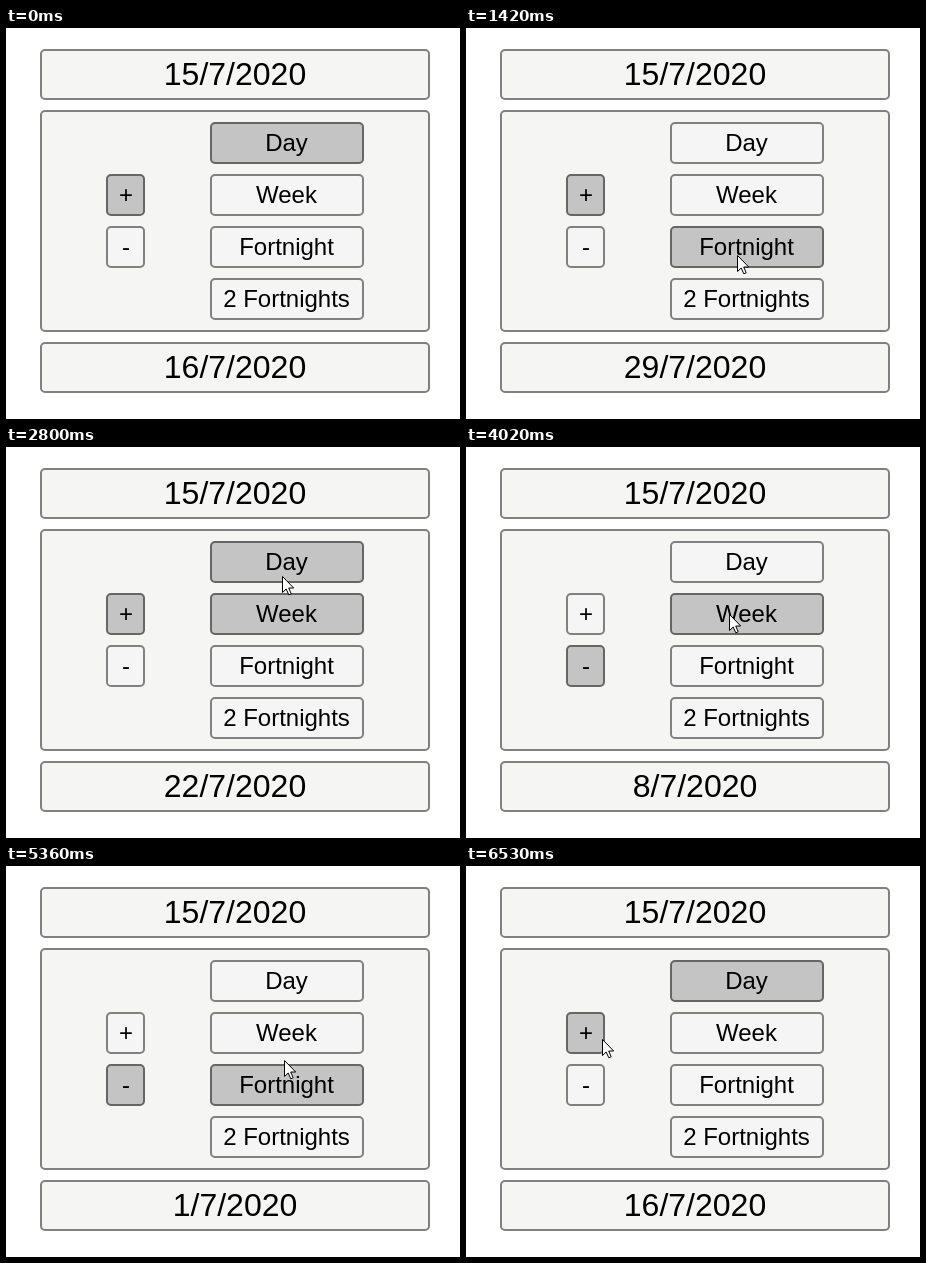
Write an HTML page that moves like this. It is 454 px wide and 391 px high and loops after 6580 ms.

```html
<!DOCTYPE html>
<html>
<head>
<meta charset="utf-8">
<style>
html, body { margin: 0; width: 100%; height: 100%; overflow: hidden; background: #fff; }
div {
  position: absolute; box-sizing: border-box;
  border: 2px solid #808080; border-radius: 5px; background: #f5f5f3; color: #000;
  font-family: "Liberation Sans", Arial, sans-serif; text-align: center; white-space: nowrap;
}
div.button { background: #f5f5f5; }
div.on { background: #c4c4c4; border-color: #666; }
svg { position: absolute; left: 0; top: 0; overflow: visible; }
</style>
</head>
<body>
<script>
const LOOP = 6580;

function box(x, y, w, h, size, text = '', className = '') {
  const el = document.createElement('div');
  el.style.cssText = `left:${x}px;top:${y}px;width:${w}px;height:${h}px;font-size:${size}px;line-height:${h - 4}px`;
  el.textContent = text;
  el.className = className;
  document.body.append(el);
  return el;
}

box(34, 21, 390, 51, 32, '15/7/2020');
box(34, 82, 390, 222, 24);
const result = box(34, 314, 390, 51, 32);

// tipY: where the pointer rests, measured from the top of the button
function button(label, group, value, row, tipY) {
  const [x, w] = group === 'days' ? [203.5, 154] : [100.4, 39];
  const y = 94 + 52 * row, h = 42;
  return { group, value, x, y, w, h, tipY: y + tipY, el: box(x, y, w, h, 24, label, 'button') };
}

const day = button('Day', 'days', 1, 0, 35);
const week = button('Week', 'days', 7, 1, 21);
const fortnight = button('Fortnight', 'days', 14, 2, 29);
const month = button('2 Fortnights', 'days', 28, 3, 14);
const plus = button('+', 'sign', 1, 1, 27);
const minus = button('-', 'sign', -1, 2, 17);
const buttons = [day, week, fortnight, month, plus, minus];

document.body.insertAdjacentHTML('beforeend',
  `<svg width="14" height="22"><path d="M.5 .5V16.5L4.2 13L6.8 18.8L9.2 17.8L6.7 12H11.7Z"
   fill="#fff" stroke="#000"/></svg>`);
const cursor = document.querySelector('svg');

// Each visit: button, arrival, click, pointer x
const visits = [
  [week, 380, 810, 277], [fortnight, 1090, 1260, 271], [month, 1600, 1700, 271],
  [fortnight, 2090, 2270, 272], [week, 2450, 2560, 275], [day, 2800, 3020, 276],
  [minus, 3370, 3460, 121], [week, 3800, 3970, 263], [fortnight, 4210, 4330, 265],
  [month, 4600, 4790, 267], [fortnight, 5010, 5160, 271], [week, 5414, 5550, 283],
  [day, 5860, 5970, 279], [plus, 6400, 6455, 136],
].map(([target, arrive, click, x]) => ({ target, arrive, click, x, y: target.tipY }));
const entry = { arrive: 90, x: 289, y: 343 };

function pointerAt(t) {
  if (t < entry.arrive) return null;
  let from = entry;
  for (const to of visits) {
    if (t < to.arrive) {
      const travel = Math.max(120, 1.4 * Math.hypot(to.x - from.x, to.y - from.y));
      const k = Math.max(0, 1 - (to.arrive - t) / travel);
      return { x: Math.round(from.x + (to.x - from.x) * k), y: Math.round(from.y + (to.y - from.y) * k) };
    }
    from = to;
  }
  return from;
}

const inside = (p, b) => p.x >= b.x && p.x < b.x + b.w && p.y >= b.y && p.y < b.y + b.h;

function draw(t) {
  const tip = pointerAt(t);
  const chosen = { days: day, sign: plus };
  for (const { target, click } of visits) {
    if (click <= t) chosen[target.group] = target;
  }
  for (const b of buttons) {
    b.el.classList.toggle('on', chosen[b.group] === b || Boolean(tip && inside(tip, b)));
  }
  const date = new Date(2020, 6, 15 + chosen.sign.value * chosen.days.value);
  result.textContent = `${date.getDate()}/${date.getMonth() + 1}/${date.getFullYear()}`;
  cursor.style.display = tip ? '' : 'none';
  if (tip) cursor.style.transform = `translate(${tip.x}px,${tip.y}px)`;
}

const origin = performance.now();
function frame() {
  draw((performance.now() - origin) % LOOP);
  requestAnimationFrame(frame);
}
frame();
</script>
</body>
</html>
```
